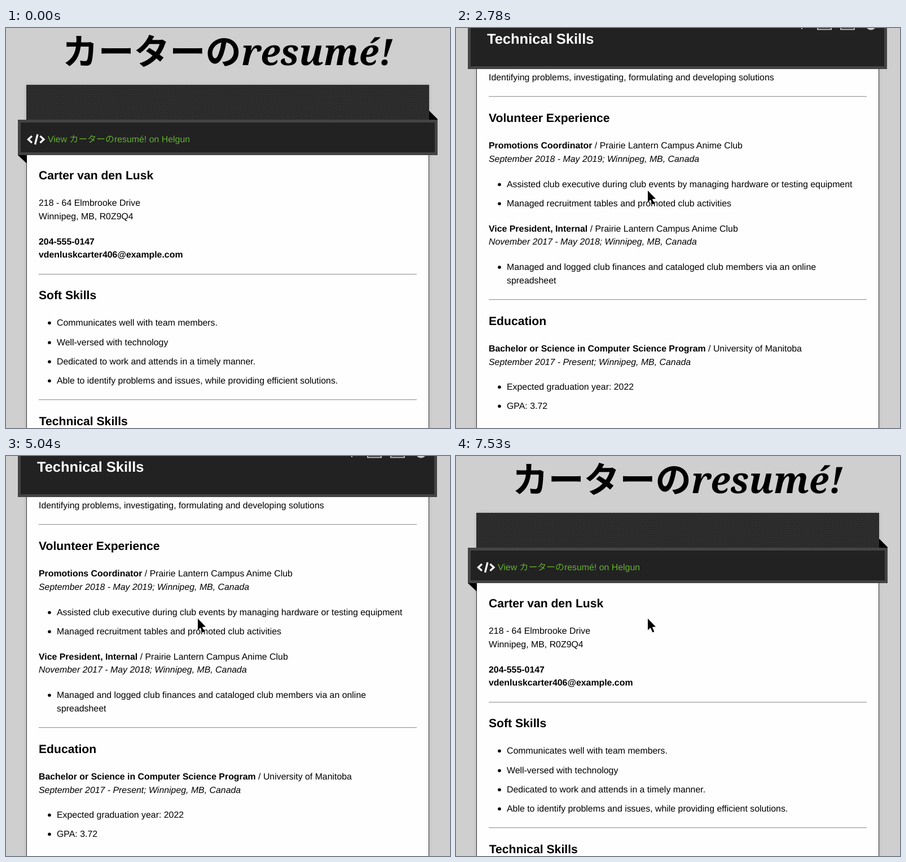
Recreate the animation shown at these times as an HTML page with a canvas. Size 787 px wide and 711 px high, loop 8000 ms.

```html
<!DOCTYPE html>
<html lang="en">
<head>
<meta charset="utf-8">
<title>Resume page scroll</title>
<style>
  html, body { margin: 0; width: 100%; height: 100%; overflow: hidden; background: #cfcfcf; }
  canvas { display: block; }
</style>
</head>
<body>
<canvas id="stage" width="787" height="711"></canvas>
<script>
const ctx = document.getElementById('stage').getContext('2d');
const W = 787, H = 711, LOOP = 8000;

const SANS = '"Liberation Sans", "Noto Sans CJK JP", "Noto Sans CJK", sans-serif';
const SERIF = '"Noto Serif", serif';
const JAPANESE = '"Noto Sans CJK JP", "Noto Sans CJK", sans-serif';
const BODY = `15.88px ${SANS}`;
const BOLD = `bold ${BODY}`;
const ITALIC = `italic ${BODY}`;
const GREEN = '#64b030';
const LEFT = 58;

const clamp = (v, lo, hi) => Math.max(lo, Math.min(hi, v));
const smooth = u => u * u * u * (10 - 15 * u + 6 * u * u);

// Turns of the mouse wheel: start, end and notches (negative is up).
const NOTCH = 105.75, MAX_SCROLL = 1218;
const TURNS = [
  { start: 585, end: 1883, notches: 6 },
  { start: 2048, end: 3090, notches: 5 },
  { start: 3350, end: 3540, notches: 1 },
  { start: 4530, end: 5035, notches: -2 },
  { start: 5160, end: 6034, notches: -4 },
  { start: 6310, end: 7525, notches: -6 }
];

// Every notch eases over an equal share of its turn and stops at the page ends.
function scrollAt(t) {
  let y = 0;
  for (const { start, end, notches } of TURNS) {
    const count = Math.abs(notches), span = (end - start) / count;
    for (let i = 0; i < count; i++) {
      const target = clamp(y + Math.sign(notches) * NOTCH, 0, MAX_SCROLL);
      y += (target - y) * smooth(clamp((t - start) / span - i, 0, 1));
    }
  }
  return Math.round(y);
}

function rect(x, y, w, h, color) {
  ctx.fillStyle = color;
  ctx.fillRect(x, y, w, h);
}

function polygon(points, color) {
  ctx.beginPath();
  points.forEach(([x, y]) => ctx.lineTo(x, y));
  ctx.closePath();
  ctx.fillStyle = color;
  ctx.fill();
}

function disc(x, y, r, color) {
  ctx.beginPath();
  ctx.arc(x, y, r, 0, Math.PI * 2);
  ctx.fillStyle = color;
  ctx.fill();
}

function framed(x, y, w, h) {
  rect(x, y, w, h, '#444');
  rect(x + 5, y + 5, w - 10, h - 10, '#222');
}

// Draws a string and returns the x where it ends.
function text(str, x, y, font = BODY, color = '#000') {
  ctx.font = font;
  ctx.fillStyle = color;
  ctx.fillText(str, x, Math.round(y));
  return x + ctx.measureText(str).width;
}

function rightText(plain, link, x, y) {
  const font = `10.6px ${SANS}`;
  ctx.font = font;
  const start = x - ctx.measureText(plain + link).width;
  text(link, text(plain, start, y, font), y, font, '#4f9a2a');
}

// Flows blocks down the page; y is the last baseline.
const LINE = 23.76;
const STYLE = {
  h2: { before: 45.7, after: 2.4, font: `bold 21.15px ${SANS}` },
  h3: { before: 52.1, after: 1.2, font: `bold 19.2px ${SANS}` },
  p: { before: 44.7, after: 0, font: BODY },
  rule: { before: 28.2, after: 0 }
};

class Flow {
  constructor(y) {
    this.y = y;
    this.after = 0;
    this.ops = [];
    this.sections = [];
  }
  advance(kind) {
    this.y += STYLE[kind].before + this.after;
    this.after = STYLE[kind].after;
  }
  put(x, ...runs) {
    const y = this.y;
    this.ops.push(() => runs.reduce((end, [str, font]) => text(str, end, y, font), x));
  }
  head(kind, str) {
    this.advance(kind);
    this.put(LEFT + (str[0] === 'T' ? 0.7 : 0), [str, STYLE[kind].font]);
  }
  para(...lines) {
    this.advance('p');
    lines.forEach((runs, i) => {
      if (i) this.y += LINE;
      this.put(LEFT, ...runs);
    });
  }
  list(...items) {
    this.advance('p');
    items.forEach((lines, i) => {
      if (i) this.y += 34.2;
      const y = Math.round(this.y) - 4.7;
      this.ops.push(() => disc(77, y, 2.8, '#000'));
      lines.split('\n').forEach((str, j) => {
        if (j) this.y += LINE;
        this.put(90, [str, BODY]);
      });
    });
  }
  section(title) {
    this.advance('rule');
    const y = Math.round(this.y);
    this.ops.push(() => {
      rect(LEFT, y, 670, 1, '#9c9c9c');
      rect(LEFT, y + 1, 670, 1, '#e6e6e6');
    });
    this.head('h2', title);
    this.sections.push({ title, top: this.y - 10 });
  }
  topic(title, str) {
    this.head('h3', title);
    this.para([[str, BODY]]);
  }
  role(name, place, dates) {
    this.para([[name, BOLD], [' / ' + place, BODY]],
      [[dates + '; Winnipeg, MB, Canada', ITALIC]]);
  }
}

function buildPage() {
  const page = new Flow(223.3);
  const club = 'Prairie Lantern Campus Anime Club';

  page.head('h2', 'Carter van den Lusk');
  page.para([['218 - 64 Elmbrooke Drive', BODY]], [['Winnipeg, MB, R0Z9Q4', BODY]]);
  page.para([['204-555-0147', BOLD]], [['vdenluskcarter406@example.com', BOLD]]);

  page.section('Soft Skills');
  page.list('Communicates well with team members.',
    'Well-versed with technology',
    'Dedicated to work and attends in a timely manner.',
    'Able to identify problems and issues, while providing efficient solutions.');

  page.section('Technical Skills');
  page.topic('Languages', 'Java, Ruby, CSS, C++, C');
  page.topic('Database Management', 'SQL');
  page.topic('Tools', 'Eclipse, QD Linear Bureau, JUnit Testing, Processing, Dr. Java');
  page.topic('Research and Planning',
    'Identifying problems, investigating, formulating and developing solutions');

  page.section('Volunteer Experience');
  page.role('Promotions Coordinator', club, 'September 2018 - May 2019');
  page.list('Assisted club executive during club events by managing hardware or testing equipment',
    'Managed recruitment tables and promoted club activities');
  page.role('Vice President, Internal', club, 'November 2017 - May 2018');
  page.list('Managed and logged club finances and cataloged club members via an online\nspreadsheet');

  page.section('Education');
  page.role('Bachelor or Science in Computer Science Program', 'University of Manitoba',
    'September 2017 - Present');
  page.list('Expected graduation year: 2022', 'GPA: 3.72');
  return page;
}

const weave = (() => {
  const tile = document.createElement('canvas');
  tile.width = 8;
  tile.height = 4;
  const c = tile.getContext('2d');
  c.fillStyle = '#292929';
  c.fillRect(0, 0, 8, 4);
  c.strokeStyle = '#363636';
  c.beginPath();
  for (const y of [-4, 0, 4]) {
    c.moveTo(0, y);
    c.lineTo(4, y + 3);
    c.lineTo(8, y);
  }
  c.stroke();
  return ctx.createPattern(tile, 'repeat');
})();

function drawCodeIcon() {
  ctx.strokeStyle = '#fff';
  ctx.lineWidth = 3.3;
  ctx.beginPath();
  for (const [x, tip] of [[46, 39.5], [60.5, 67]]) {
    ctx.moveTo(x, 192);
    ctx.lineTo(tip, 198);
    ctx.lineTo(x, 204);
  }
  ctx.moveTo(56, 189);
  ctx.lineTo(51.5, 207);
  ctx.stroke();
}

function drawTop() {
  const end = text('カーターの', 100, 65, `bold 63.4px ${JAPANESE}`);
  text('resumé!', end, 66, `italic bold 64.8px ${SERIF}`);

  ctx.save();
  ctx.shadowColor = 'rgba(0,0,0,.15)';
  ctx.shadowBlur = 6;
  rect(36, 101, 714, 1650, '#333');
  ctx.restore();
  rect(37, 226, 712, 1520, '#fefefe');
  rect(36, 101, 714, 62, weave);

  polygon([[750, 147], [765, 162], [765, 163], [750, 163]], '#000');
  polygon([[21, 226], [37, 226], [37, 241]], '#000');
  framed(21, 163, 744, 63);
  drawCodeIcon();
  text('View カーターのresumé! on Helgun', 74, 203, BODY, GREEN);
}

function drawAvatar(x, y) {
  const cell = 8.8;
  rect(x, y, 64, 64, '#666');
  rect(x + 5, y + 4, 54, 54, '#222');
  rect(x + 6, y + 5, 52, 52, '#f0f0f0');
  ['10101', '11111', '00100', '00100', '10101'].forEach((row, j) => {
    [...row].forEach((bit, i) => {
      if (bit === '1') rect(x + 10.5 + i * cell, y + 9 + j * cell, cell, cell, '#56cd78');
    });
  });
}

function drawFooter() {
  framed(25, 1738, 736, 78);
  drawAvatar(46, 1744);
  const y = 1782, plain = `15.9px ${SERIF}`, link = `italic ${plain}`;
  text('View', 121, y, plain, '#ddd');
  text('Quillobert', 159, y, link, GREEN);
  text('on', 253, y, plain, '#ddd');
  text('Helgun', 275, y, link, GREEN);
  rightText('This page generated using ', 'Helgun Pages', 750, 1864);
  rightText('theme by ', 'Ted Malvin', 750, 1879);
}

function drawSticky(title) {
  rect(21, 0, 743, 73, '#444');
  rect(26, 0, 733, 68, '#222');
  text(title, title[0] === 'T' ? 55 : 54, 28, `bold 25.5px ${SANS}`, '#fff');

  // Lower edges of a row of icons cut off by the top of the window.
  rect(612, 0, 2, 2, '#bbb');
  for (const x of [641, 682]) {
    ctx.strokeStyle = '#bbb';
    ctx.lineWidth = 2;
    ctx.strokeRect(x, -9, 24, 11.5);
  }
  disc(735.5, -6, 9.5, '#ccc');
}

// The pointer glides in from the lower right corner and then rests.
function drawCursor(t) {
  if (t < 70) return;
  const left = Math.pow(1 - clamp((t - 70) / 290, 0, 1), 1.6);
  ctx.save();
  ctx.translate(340 + 381 * left, 289 + 405 * left);
  polygon([[0, 0], [0, 20.5], [4.8, 16.2], [8.4, 24.5], [11.4, 23.2], [7.9, 15], [14, 14.5]], '#000');
  ctx.globalCompositeOperation = 'destination-over';
  ctx.restore();
}

function draw(now) {
  const t = now % LOOP, y = scrollAt(t);
  rect(0, 0, W, H, '#cfcfcf');
  ctx.save();
  ctx.translate(0, -y);
  drawTop();
  page.ops.forEach(op => op());
  drawFooter();
  ctx.restore();
  const current = page.sections.filter(s => y > s.top).pop();
  if (current) drawSticky(current.title);
  drawCursor(t);
}

ctx.textRendering = 'geometricPrecision';
const page = buildPage();
let start;
function tick(now) {
  start ??= now;
  draw(now - start);
  requestAnimationFrame(tick);
}
draw(0);
requestAnimationFrame(tick);
</script>
</body>
</html>
```
